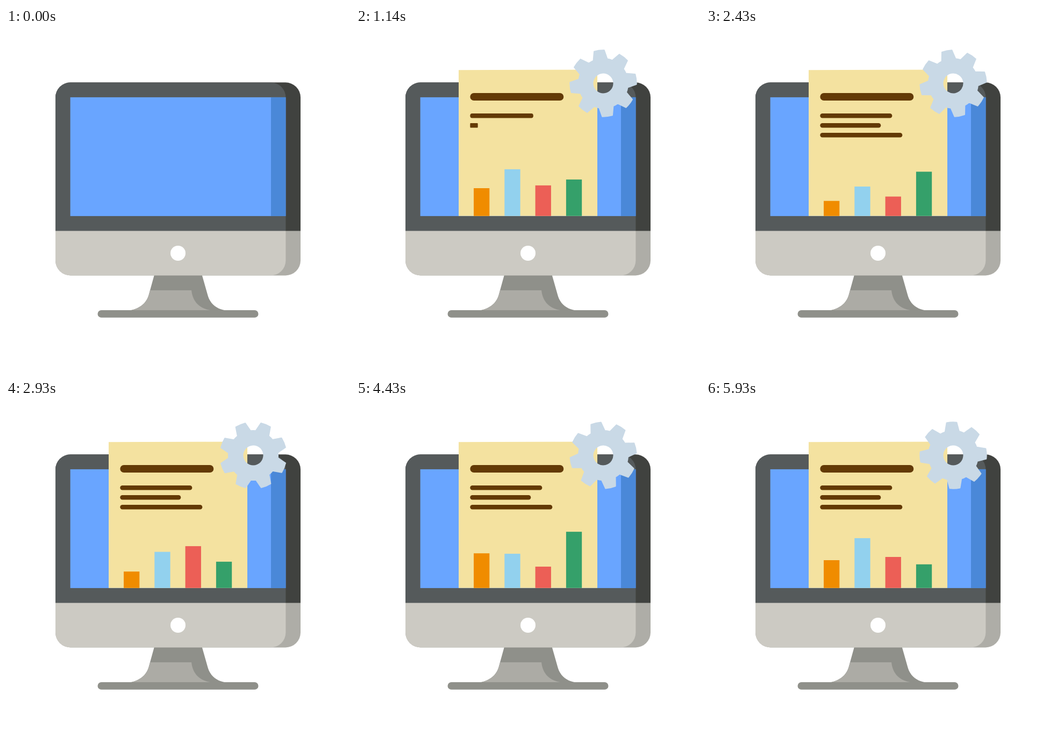
Recreate the animation shown at these times as an HTML page. Size 640x640 px, loop 6 s.

```html
<!DOCTYPE html>
<html lang="en">
<head>
<meta charset="utf-8">
<title>Report on a desktop screen</title>
<style>
  html, body { margin: 0; width: 100%; height: 100%; overflow: hidden; background: #fff; }
  svg { display: block; width: 100%; height: 100%; }
</style>
</head>
<body>
<svg viewBox="0 0 640 640">
  <defs>
    <clipPath id="case"><rect x="92" y="101.300" width="456" height="359.200" rx="28"/></clipPath>
    <clipPath id="front"><rect x="64" y="101.300" width="456.400" height="359.200" rx="28"/></clipPath>
    <clipPath id="above"><rect width="640" height="349.700"/></clipPath>
  </defs>

  <!-- stand -->
  <path fill="#8f908a" d="M276 459H364.500L375 496C379 512 391 523 409 525.500H231C249 522 261 512 265.500 497Z"/>
  <path fill="#acaba5" d="M268 488H345C347 508 359 523 384 525.500H231C249 522 261 512 265.500 497Z"/>
  <rect x="170.500" y="525" width="299" height="13.800" rx="6.900" fill="#8f908a"/>

  <!-- case -->
  <g clip-path="url(#case)">
    <rect x="92" y="101" width="456" height="277" fill="#40423f"/>
    <rect x="92" y="377.500" width="456" height="84" fill="#aeada7"/>
    <g clip-path="url(#front)">
      <rect x="92" y="101" width="456" height="277" fill="#555a5b"/>
      <rect x="92" y="377.500" width="456" height="84" fill="#cccac3"/>
    </g>
  </g>
  <rect x="119.600" y="128.900" width="400.800" height="221" fill="#69a5ff"/>
  <rect x="493" y="128.900" width="27.400" height="221" fill="#4a88d8"/>
  <circle cx="320" cy="419" r="14" fill="#fff"/>

  <!-- report -->
  <g clip-path="url(#above)">
    <path id="paper" fill="#f4e2a0" d="M191 .3L449 -.6V310H191Z"/>
    <g id="bars"></g>
  </g>
  <g id="lines" fill="#633a05"></g>

  <path id="gear" fill="#c9d9e6" stroke="#c9d9e6" stroke-width="2" stroke-linejoin="round" fill-rule="evenodd"/>
</svg>
<script>
const LOOP = 6000;
const CYCLE = LOOP * 3 / 7;
const BEAT = CYCLE / 12;
const BARS_START = 470;
const $ = id => document.getElementById(id);

function addRect(parent, attrs) {
  const el = document.createElementNS("http://www.w3.org/2000/svg", "rect");
  for (const k in attrs) el.setAttribute(k, attrs[k]);
  return parent.appendChild(el);
}

const clamp = p => Math.min(1, Math.max(0, p));
const easeOut = p => 1 - (1 - p) ** 2;
const easeInOut = p => p * p * (3 - 2 * p);
const progress = (t, start, length) => clamp((t - start) / length);

// Goes from zero to one by way of a peak.
const overshoot = (t, start, top, end, peak) =>
  peak * easeOut(progress(t, start, top - start)) +
  (1 - peak) * easeInOut(progress(t, top, end - top));

const lines = [174, 134, 113, 153].map((width, i) => {
  const height = i ? 8.5 : 14;
  const y = i ? 141 + 18 * i : 121;
  return addRect($("lines"), { y, width, height, rx: height / 2 });
});

// Each bar drifts between five levels, then drops and grows back.
const levelBeats = [1, 3, 6, 9, 11];
const bars = [
  { fill: "#f08c00", delay: 0, levels: [52, 52, 65, 24, 32] },
  { fill: "#92d1ee", delay: 85, levels: [93, 86, 64, 54, 70] },
  { fill: "#ec5f56", delay: -20, levels: [58, 57, 40, 36, 81] },
  { fill: "#35a06a", delay: 75, levels: [44, 73, 105, 80, 51] }
];
bars.forEach((bar, i) => {
  bar.el = addRect($("bars"), { x: 219 + 57.3 * i, width: 29.3, fill: bar.fill });
});

function barHeight({ delay, levels }, t) {
  const time = t - BARS_START;
  const phase = time < 0 ? time : time % CYCLE;
  const beat = (phase - 100) / BEAT;
  const level = levels.reduce((h, next, i) => i
    ? h + (next - levels[i - 1]) * progress(beat, levelBeats[i - 1], levelBeats[i] - levelBeats[i - 1])
    : next, 0);
  return level * progress(phase, delay, 200) * (1 - progress(beat, 11, 0.5));
}

function gearPath(teeth) {
  const at = (r, deg) => {
    const a = deg * Math.PI / 180;
    return (r * Math.sin(a)).toFixed(2) + " " + (-r * Math.cos(a)).toFixed(2);
  };
  const step = 360 / teeth;
  let d = "";
  for (let a = 0; a < 360; a += step) {
    d += (a ? "L" : "M") + at(46, a - 16.5) + "L" + at(61.7, a - 8.8) +
         "A62 62 0 0 1 " + at(61.7, a + 8.8) + "L" + at(46, a + 16.5) +
         "A46 46 0 0 1 " + at(46, a + step - 16.5);
  }
  return d + "ZM-19.500 0A19.500 19.500 0 1 0 19.500 0A19.500 19.500 0 1 0 -19.500 0Z";
}
$("gear").setAttribute("d", gearPath(8));

function draw(t) {
  const rise = overshoot(t, 30, 440, 750, 297 / 273);
  $("paper").setAttribute("transform", `translate(0 ${351 - 273 * rise})`);

  lines.forEach((el, i) => {
    const grow = progress(t, 490 + 300 * i, 400);
    el.setAttribute("transform", `translate(212.300 0) scale(${grow} 1)`);
  });

  for (const bar of bars) {
    const h = barHeight(bar, t);
    bar.el.setAttribute("y", 350 - h);
    bar.el.setAttribute("height", h);
  }

  const size = overshoot(t, 620, 880, 1080, 1.1);
  const angle = (t - LOOP) / 15 + 1.8;
  $("gear").setAttribute("transform", `translate(460 103) rotate(${angle}) scale(${size})`);
  $("gear").setAttribute("visibility", size > 0 ? "visible" : "hidden");
}

const begin = performance.now();
function tick() {
  draw((performance.now() - begin) % LOOP);
  requestAnimationFrame(tick);
}
tick();
</script>
</body>
</html>
```
